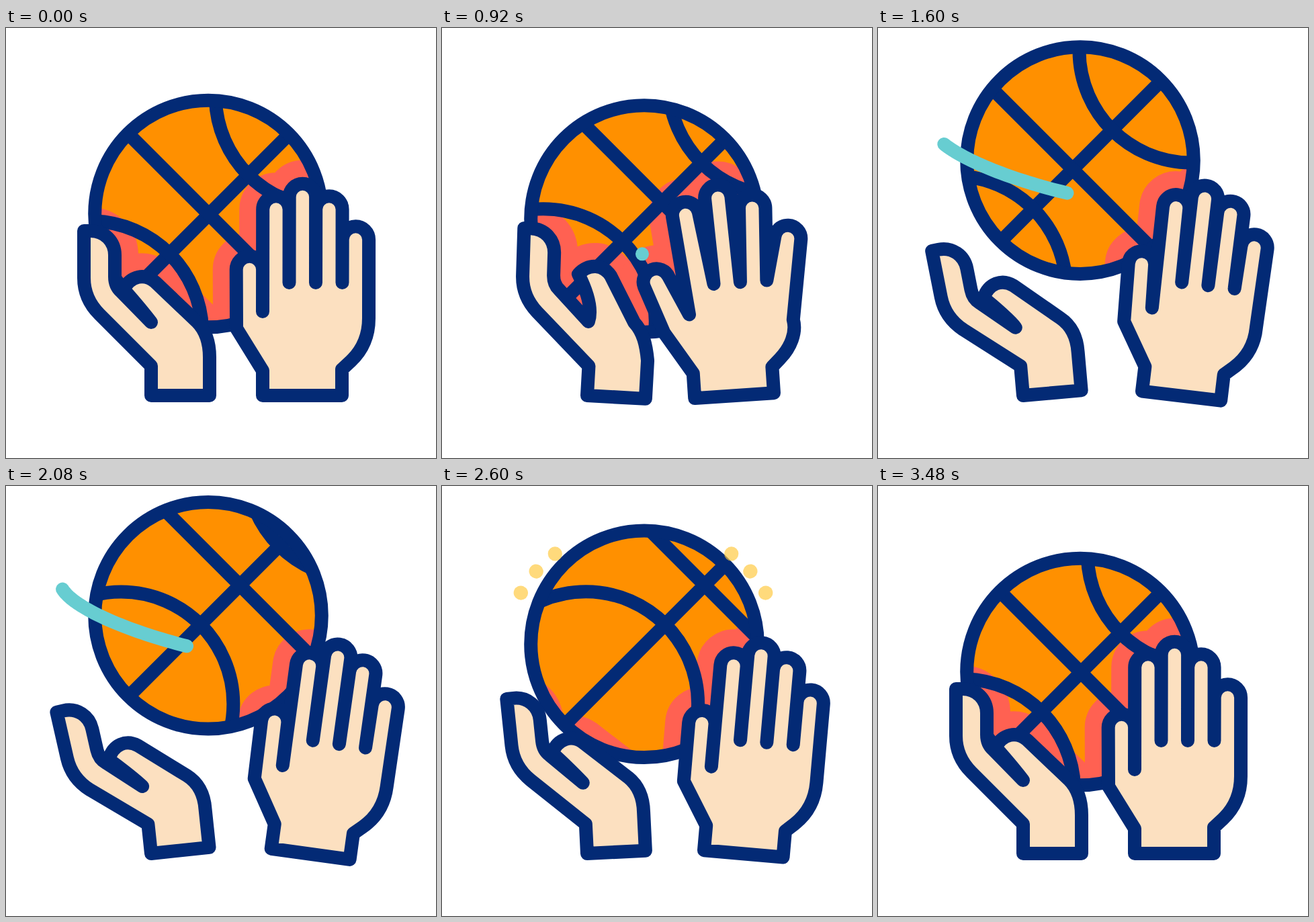
Animation, 640 px wide and 640 px high, one loop 3600 ms. Source, as an HTML page:

```html
<!DOCTYPE html>
<html lang="en">
<head>
<meta charset="utf-8">
<title>Basketball throw</title>
<style>
html, body { margin: 0; width: 100%; height: 100%; overflow: hidden; background: #fff; }
svg { display: block; width: 100vw; height: 100vh; }
path, circle { stroke-linecap: round; stroke-linejoin: round; }
.line { fill: none; stroke: #032a75; stroke-width: 20; }
.hand { fill: #fce0c0; stroke: #032a75; stroke-width: 20; }
.shade { fill: #ff6152; stroke: #ff6152; stroke-width: 70; }
.trail { fill: none; stroke: #67cdd1; stroke-width: 20; }
.spark { fill: none; stroke: #ffc738; stroke-width: 21; }
</style>
</head>
<body>
<svg viewBox="0 0 640 640">
  <clipPath id="clip"><circle class="ball" cx="301" cy="276" r="170"/></clipPath>
  <path class="trail" id="back"/>
  <g clip-path="url(#clip)">
    <circle class="ball" cx="301" cy="276" r="170" fill="#ff9000"/>
    <path class="shade" id="leftShade"/>
    <path class="shade" id="rightShade"/>
    <g id="seams" class="line">
      <path d="M-190 0H190"/>
      <path id="roll" d="M0-190V190M-250-167A167 167 0 0 1-250 167M250-167A167 167 0 0 0 250 167"/>
    </g>
  </g>
  <circle class="ball line" cx="301" cy="276" r="168.8"/>
  <path class="trail" id="front"/>
  <path class="spark" id="sparks"/>
  <path class="hand" id="left"/>
  <path class="hand" id="right"/>
</svg>
<script>
const LOOP = 3600, TURN = 540, RAD = Math.PI / 180;
const $ = id => document.getElementById(id);
const balls = document.querySelectorAll('.ball');

// Progress from a to b, and easings on it
const part = (t, a, b) => Math.max(0, Math.min(1, (t - a) / (b - a)));
const smooth = u => u * u * (3 - 2 * u);
const sineOut = u => Math.sin(u * Math.PI / 2);
const sineIn = u => 1 - Math.cos(u * Math.PI / 2);
const bump = u => Math.sin(u * Math.PI);

// Smooth monotone curve through [time, value] points
function curve(...k) {
  const sec = i => (k[i + 1][1] - k[i][1]) / (k[i + 1][0] - k[i][0]);
  const slope = i => {
    if (i === 0 || i === k.length - 1) return 0;
    const a = sec(i - 1), b = sec(i);
    return a * b <= 0 ? 0 : 2 * a * b / (a + b);
  };
  return t => {
    let i = 0;
    while (i < k.length - 2 && t >= k[i + 1][0]) i++;
    const [t0, v0] = k[i], [t1, v1] = k[i + 1];
    const h = t1 - t0, s = part(t, t0, t1), r = 1 - s;
    return r * r * (1 + 2 * s) * v0 + s * s * (3 - 2 * s) * v1
      + h * s * r * (r * slope(i) - s * slope(i + 1));
  };
}

const spin = curve([120, 0], [920, 36], [1260, 310], [1600, 1061], [2080, 1684], [2600, 2285], [3480, 2700]);
const head = curve([920, 90.8], [1260, -232.8], [1600, -624], [2080, -981], [2400, -1160]);
const trailSize = curve([920, 0], [1260, 84], [1600, 62], [2080, 72], [2400, 0]);

// Everything the pose depends on: wind up, launch, float, fall, catch
function poseAt(t) {
  const wind = smooth(part(t, 120, 640)), launch = smooth(part(t, 920, 1220));
  const float = part(t, 1220, 2340), lift = sineOut(float);
  const fall = sineIn(part(t, 2260, 2760)), grab = bump(part(t, 2760, 3480));
  return {
    y: 276.5 + 7.5 * wind - 83.5 * launch - 10 * float + 86 * fall
      + 5 * bump(part(t, 2760, 3100)),
    grip: wind * (1 - 0.8 * launch) * (1 - float) + 0.3 * grab,
    open: (0.74 * launch + 0.27 * lift) * (1 - smooth(part(t, 2260, 2900))),
    tilt: 3.8 * wind * (launch - 1)
      + (5.6 * launch + 2.4 * lift) * (1 - smooth(part(t, 2360, 2940))) - grab
  };
}

const turn = (x, y, deg, px, py) => {
  const c = Math.cos(deg * RAD), s = Math.sin(deg * RAD), dx = x - px, dy = y - py;
  return [px + dx * c - dy * s, py + dx * s + dy * c];
};
const remap = (path, fn) => path.replace(/(\d+) (\d+)/g,
  (_, x, y) => fn(+x, +y).map(v => v.toFixed(2)).join(' '));

// The arm turns at its base, the palm at the wrist, the thumb on the palm
function leftHand(open, grip) {
  const arm = (x, y) => turn(x, y, 3.2 * grip - 6.2 * open, 216, 547);
  const palm = (x, y) => turn(x, y, 1.8 * grip - 13 * open, 250, 500);
  const thumb = (x, y) => palm(...turn(x, y, 14.5 * grip, 270, 472));
  return remap('M216 547L216 503', arm)
    + remap('L139 426C123 410 116 392 116 372L116 302L126 302C147 302 162 318 162 338'
      + 'L162 370Q162 384 171 392L216 438', palm)
    + remap('C210 430 189 404 175 389C186 368 207 365 222 378', thumb)
    + remap('L284 437C298 451 303 470 ', palm)
    + remap('303 490L303 547Z', arm);
}

const TIPS = [359.5, 270, 251.5, 270, 315];

function rightHand(grip) {
  const r = 19.7, step = 39.5;
  let d = 'M382 547V510L343 447';
  TIPS.forEach((y, i) => {
    const dx = 10.3 * (i - 2.5) * grip, a = Math.atan2(dx, i ? 130 : 80);
    const cx = 362.4 + step * i + dx, cy = y + dx * dx / 60;
    const ox = r * Math.cos(a), oy = r * Math.sin(a);
    d += `L${cx - ox} ${cy - oy}A${r} ${r} 0 0 1 ${cx + ox} ${cy + oy}`;
    if (i < 4) d += `L${382 + step * i} ${i ? 379 : 422}`;
  });
  return d + `L${540 - 4 * grip} ${432 + 8 * grip}C540 460 529 481 513 496L500 508V547Z`;
}

// Orbit around the ball, split into the near and far half
function orbit(from, to, y) {
  const out = { front: '', back: '' };
  const n = Math.max(1, Math.ceil((from - to) / 2));
  let last = '';
  for (let i = 0; i <= n; i++) {
    const f = (from + (to - from) * i / n) * RAD, c = Math.cos(f), s = Math.sin(f);
    const side = s >= 0 ? 'front' : 'back';
    const pt = (301 + 220 * c).toFixed(2) + ' ' + (y - 1 + 48 * c + 54 * s).toFixed(2);
    out[side] += side === last ? 'L' + pt : `M${pt}L${pt}`;
    last = side;
  }
  return out;
}

// Three rays on each side of the ball
function sparkPath(a, b) {
  let d = '';
  for (const side of [-1, 1]) for (let i = 0; i < 3; i++) {
    const f = (44.5 + 11.5 * i) * RAD, r = 187 + 5 * i;
    const at = k => `${299.5 + side * (r + k) * Math.sin(f)} ${234.5 - (r + k) * Math.cos(f)}`;
    d += `M${at(a)}L${at(b)}`;
  }
  return d;
}

function draw(t) {
  const { y, grip, open, tilt } = poseAt(t);
  balls.forEach(b => b.setAttribute('cy', y));
  $('seams').setAttribute('transform', `translate(302 ${y + 1}) rotate(-45)`);
  const p = (spin(t) + TURN / 2) % TURN - TURN / 2;
  $('roll').setAttribute('transform', `translate(${p} 0)`);

  const left = leftHand(open, grip), right = rightHand(grip);
  for (const id of ['left', 'leftShade']) $(id).setAttribute('d', left);
  for (const id of ['right', 'rightShade']) {
    $(id).setAttribute('d', right);
    $(id).setAttribute('transform', `rotate(${tilt} 441 636)`);
  }

  const flying = t >= 910 && t < 2400, h = head(t);
  const o = flying ? orbit(h + trailSize(t), h, y) : { front: '', back: '' };
  $('front').setAttribute('d', o.front);
  $('back').setAttribute('d', o.back);

  const lit = t > 2570 && t < 2900;
  $('sparks').setAttribute('d', lit
    ? sparkPath(32 * smooth(part(t, 2660, 2900)), 32 * smooth(part(t, 2590, 2760))) : '');
  $('sparks').setAttribute('opacity', Math.min(part(t, 2565, 2620), 1 - part(t, 2840, 2900)));
}

const start = performance.now();
function tick() {
  draw((performance.now() - start) % LOOP);
  requestAnimationFrame(tick);
}
draw(0);
requestAnimationFrame(tick);
</script>
</body>
</html>
```
